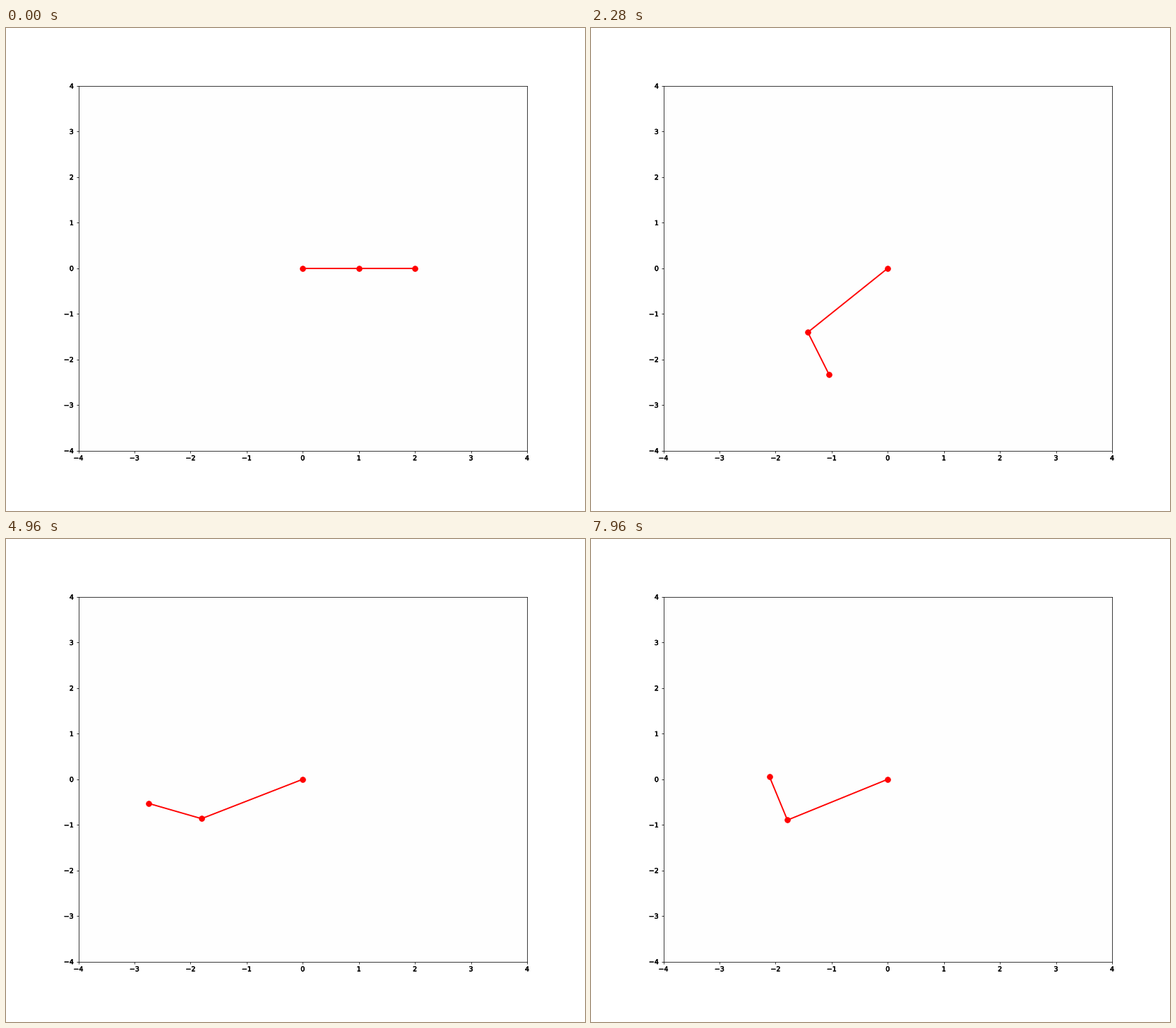
Animation of 820 by 683 pixels, one loop 8000 ms. Source, as a matplotlib script:

```python
import math

import matplotlib.pyplot as plt
import matplotlib.patheffects as pe
from matplotlib.animation import FuncAnimation

W, H, DPI = 820, 683, 64
K = 72 * W / 864 / DPI        # scales point sizes to the stage

# Double pendulum: masses, rod lengths, gravity
M1, M2 = 2.0, 1.0
L1, L2 = 2.0, 1.0
G = 9.81

FRAMES, STEP_MS = 200, 40
SUBSTEPS = 20


def slope(state):
    a, va, b, vb = state
    s, c = math.sin(a - b), math.cos(a - b)
    pull = L1 * s * va * va - G * math.sin(b)
    acc_a = (-M2 * L2 * s * vb * vb - (M1 + M2) * G * math.sin(a)
             - M2 * c * pull) / (L1 * (M1 + M2 - M2 * c * c))
    acc_b = (pull - L1 * c * acc_a) / L2
    return va, acc_a, vb, acc_b


def shift(state, k, h):
    return [x + h * d for x, d in zip(state, k)]


def rk4(state, h):
    k1 = slope(state)
    k2 = slope(shift(state, k1, h / 2))
    k3 = slope(shift(state, k2, h / 2))
    k4 = slope(shift(state, k3, h))
    return [x + h / 6 * (p + 2 * q + 2 * r + t)
            for x, p, q, r, t in zip(state, k1, k2, k3, k4)]


def swing():
    """Angles of both rods at every frame, released from rest."""
    state = [math.pi / 2, 0.0, -math.pi / 2, 0.0]
    h = STEP_MS / 1000 / SUBSTEPS
    path = []
    for _ in range(FRAMES):
        path.append((state[0], state[2]))
        for _ in range(SUBSTEPS):
            state = rk4(state, h)
    return path


def joints(a, b):
    x1, y1 = L1 * math.sin(a), -L1 * math.cos(a)
    return [0, x1, x1 + L2 * math.sin(b)], [0, y1, y1 - L2 * math.cos(b)]


plt.rcParams["font.family"] = "DejaVu Sans"
fig = plt.figure(figsize=(W / DPI, H / DPI), dpi=DPI, facecolor="white")
ax = fig.add_axes([0.125, 0.125, 0.775, 0.755], facecolor="#fefefe")
ax.set(xlim=(-4, 4), ylim=(-4, 4), xticks=range(-4, 5), yticks=range(-4, 5))
ax.tick_params(labelsize=10 * K, length=3.5 * K, pad=3.5 * K, width=0.8 * K)
for spine in ax.spines.values():
    spine.set_linewidth(0.8 * K)
for label in ax.get_xticklabels() + ax.get_yticklabels():
    label.set_path_effects([pe.withStroke(linewidth=0.5, foreground="black")])

rods, = ax.plot([], [], "ro-", lw=2 * K, markersize=8 * K,
                markeredgewidth=K)
path = swing()


def draw(i):
    rods.set_data(*joints(*path[i]))
    return rods,


anim = FuncAnimation(fig, draw, frames=FRAMES, interval=STEP_MS,
                     init_func=lambda: draw(0), repeat=True, repeat_delay=0)
plt.show()
```
